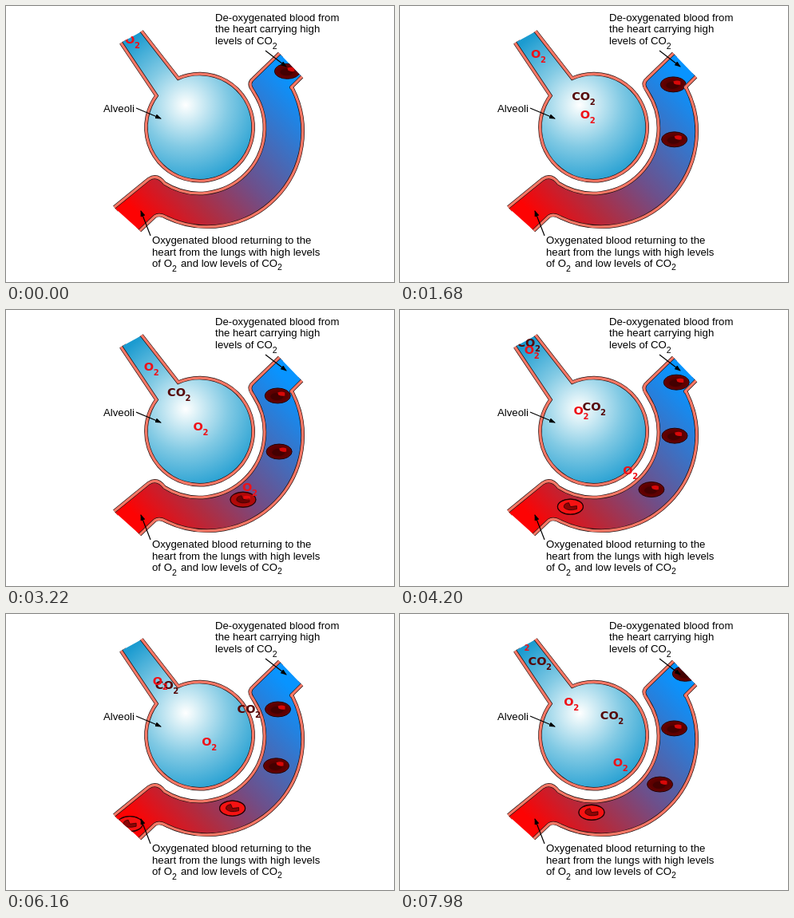
Animation of 486 by 346 pixels, one loop 8000 ms. Source, as an HTML page:

```html
<!DOCTYPE html>
<html lang="en">
<head>
<meta charset="utf-8">
<title>Gas exchange in the alveoli</title>
<style>
html, body { margin: 0; width: 100%; height: 100%; overflow: hidden; background: #fff; }
svg { display: block; width: 486px; height: 346px; }
text { font: 13.2px "Liberation Sans", Arial, sans-serif; }
.sub { font-size: 10.5px; }
.gas text { font: bold 14.5px "DejaVu Sans", Verdana, sans-serif; }
.gas .low { font-size: 10px; }
.wall { fill: none; }
.arrows path { stroke: #000; stroke-width: 1.2; marker-end: url(#tip); }
</style>
</head>
<body>
<svg viewBox="0 0 486 346">
  <defs>
    <radialGradient id="air" gradientUnits="userSpaceOnUse" cx="225" cy="124" r="106">
      <stop offset="0" stop-color="#fff"/>
      <stop offset=".1" stop-color="#e6f5f9"/>
      <stop offset=".5" stop-color="#82cae4"/>
      <stop offset="1" stop-color="#1b9bd0"/>
    </radialGradient>
    <linearGradient id="blood" gradientUnits="userSpaceOnUse" x1="345" y1="80" x2="160" y2="255">
      <stop offset="0" stop-color="#0894ff"/>
      <stop offset=".5" stop-color="#6e4f8a"/>
      <stop offset=".75" stop-color="#b02c40"/>
      <stop offset="1" stop-color="#fd0303"/>
    </linearGradient>
    <radialGradient id="dark">
      <stop offset="0" stop-color="#480000"/>
      <stop offset="1" stop-color="#680000"/>
    </radialGradient>
    <path id="sac" d="M146 45L191.300 112.500A64.800 64.800 0 1 0 215 93.500L168 33"/>
    <path id="near" d="M344 61L311 93Q306 97 310 103L313 108A84 84 0 0 1 197 224Q189 213 180 219L137 254"/>
    <path id="far" d="M166 280L185 262Q192 257 202 263A117 117 0 0 0 357 105Q353 102 357 99L369 87"/>
    <clipPath id="inVessel"><path class="lumen"/></clipPath>
    <clipPath id="belowMouth"><path d="M117 63L195 15H400V346H117Z"/></clipPath>
    <marker id="tip" markerUnits="userSpaceOnUse" markerWidth="8" markerHeight="6" refX="7" refY="3" orient="auto">
      <path d="M0 0L8 3L0 6Z" style="stroke: none; marker: none"/>
    </marker>
    <g id="darkCell">
      <ellipse rx="16" ry="9.5" fill="url(#dark)" stroke="#200"/>
      <ellipse cx="-1" cy="1" rx="8" ry="4.500" fill="#440000"/>
      <path d="M0-4Q5-6 9-4V0Q5 1 1-1Z" fill="#d80808"/>
    </g>
    <g id="redCell">
      <ellipse rx="16" ry="9.500" fill="#f51212" stroke="#200" stroke-width="1.300"/>
      <path d="M-2-5Q-9-4-8 1Q-3 6 8 3V-1L0 0Z" fill="#8c0505" stroke="#300" stroke-width=".8"/>
    </g>
    <path id="cellTrack" d="M376 48L346 91C334 110 344 125 344 155C346 207 306 247 255 249C225 251 205 235 150 266L118 290"/>
    <path id="carbonTrack" d="M316 109Q287 140 239 119Q205 100 173 57L146 22"/>
    <path id="oxygenTrack" d="M140 21L306 224"/>
  </defs>

  <g id="vesselWalls"></g>
  <path class="lumen" fill="url(#blood)"/>
  <g id="cells" clip-path="url(#inVessel)"></g>
  <g id="sacWalls"></g>
  <use href="#sac" fill="url(#air)"/>
  <g class="gas" clip-path="url(#belowMouth)">
    <g id="carbon" fill="#560808"></g>
    <g id="oxygen" fill="#ee1118"></g>
  </g>

  <g class="arrows">
    <path d="M163 128L194 141"/>
    <path d="M325 56L351 76"/>
    <path d="M181 288L169 257"/>
  </g>
  <text x="122" y="133">Alveoli</text>
  <text x="262" y="19">De-oxygenated blood from</text>
  <text x="262" y="33">the heart carrying high</text>
  <text x="262" y="48">levels of CO<tspan class="sub" dy="6">2</tspan></text>
  <text x="183" y="298">Oxygenated blood returning to the</text>
  <text x="183" y="313">heart from the lungs with high levels</text>
  <text x="183" y="327">of O<tspan class="sub" dy="6">2</tspan><tspan x="219" dy="-6">and low levels of CO</tspan><tspan class="sub" dy="4">2</tspan></text>
</svg>
<script>
const LOOP = 8000, STEP = 140, PERIOD = 1350, COUNT = 7;

const $ = id => document.getElementById(id);

function addWalls(id, shapes) {
  const layers = [['#211', 9.2], ['#f97866', 7.8], ['#211', 1.4]];
  $(id).innerHTML = layers.map(([color, width]) => shapes.map(shape =>
    `<use class="wall" href="#${shape}" stroke="${color}" stroke-width="${width}"/>`).join('')).join('');
}

// A stream of equal items on one track; distance(age) gives how far an item has gone.
function makeStream(id, trackId, markup, distance) {
  $(id).innerHTML = `<g>${markup}</g>`.repeat(COUNT);
  const track = $(trackId);
  return { items: [...$(id).children], track, length: track.getTotalLength(), distance };
}

const gas = (name, x, lowX) =>
  `<text x="${x}" y="5">${name}</text><text class="low" x="${lowX}" y="11">2</text>`;

// Cells enter quickly, speed up gently along the bend and leave faster still.
function cellDistance(age) {
  const t = age - 150;
  return 52 + 0.048 * t + 2e-6 * t * t + 0.024 * Math.min(0, t) + 0.035 * Math.max(0, age - 3500);
}

const lumen = $('near').getAttribute('d') + $('far').getAttribute('d').replace('M', 'L') + 'Z';
document.querySelectorAll('.lumen').forEach(path => path.setAttribute('d', lumen));
addWalls('vesselWalls', ['near', 'far']);
addWalls('sacWalls', ['sac']);

const cells = makeStream('cells', 'cellTrack', '<use href="#darkCell"/><use href="#redCell"/>', cellDistance);
const carbon = makeStream('carbon', 'carbonTrack', gas('CO', -14, 8.5), age => 0.0857 * (age - 570));
const oxygen = makeStream('oxygen', 'oxygenTrack', gas('O', -8, 4), age => 0.0722 * (age + 370));

function place(stream, i, age) {
  const way = stream.distance(age), item = stream.items[i];
  const visible = way >= 0 && way <= stream.length;
  item.style.display = visible ? '' : 'none';
  if (!visible) return;
  const { x, y } = stream.track.getPointAtLength(way);
  item.setAttribute('transform', `translate(${x} ${y})`);
}

function draw(now) {
  const time = Math.floor(now % LOOP / STEP) * STEP;
  for (let i = 0; i < COUNT; i++) {
    const age = time - i * PERIOD;
    for (const stream of [cells, carbon, oxygen]) place(stream, i, age);
    // The cell brightens as it takes up oxygen
    cells.items[i].lastChild.style.opacity = Math.min(1, Math.max(0, (age - 3000) / 400));
  }
}

const start = performance.now();
function tick() {
  draw(performance.now() - start);
  requestAnimationFrame(tick);
}
tick();
</script>
</body>
</html>
```
